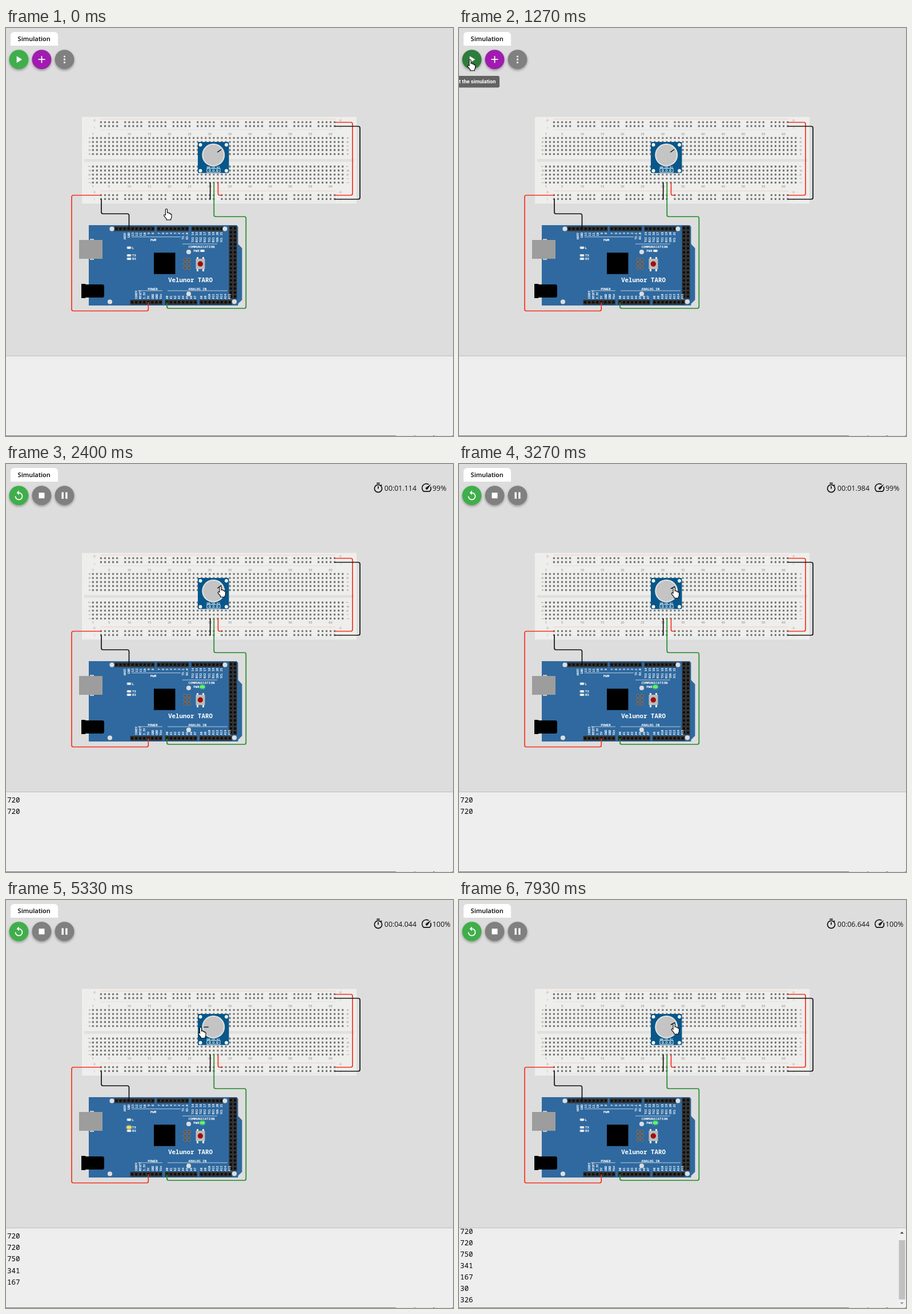
These frames come from a looping animation (783x716 px, 8000 ms). An HTML page:

```html
<!DOCTYPE html>
<html lang="en">
<head>
<meta charset="utf-8">
<title>Circuit simulation</title>
<style>
html, body { margin: 0; width: 100%; height: 100%; overflow: hidden; background: #ddd; }
svg { display: block; }
.tab { font: 600 11px "Open Sans", sans-serif; }
.ui { font: 600 9.2px Roboto, sans-serif; }
.clock { font: 12.4px "Open Sans", sans-serif; fill: #111; }
.mono { font-family: "Noto Sans Mono", monospace; }
.pins { font: 700 5.1px "Noto Sans Mono", monospace; fill: #fff; }
.grid { font: 600 5.6px "Open Sans", sans-serif; fill: #999; text-anchor: middle; }
.mid { text-anchor: middle; }
</style>
</head>
<body>
<svg id="stage" width="783" height="716" viewBox="0 0 783 716">
  <defs>
    <filter id="shadow" x="-30%" y="-30%" width="160%" height="170%">
      <feDropShadow dx="0" dy="2" stdDeviation="2" flood-opacity=".35"/>
    </filter>
    <filter id="glow" x="-100%" y="-100%" width="300%" height="300%"><feGaussianBlur stdDeviation="1.3"/></filter>
    <clipPath id="log"><rect y="576" width="770" height="139"/></clipPath>
  </defs>
  <rect width="783" height="716" fill="#ddd"/>
  <path d="M8 31V14q0-7 7-7H84q7 0 7 7V31z" fill="#fff"/>
  <text x="49.2" y="23.4" class="mid tab">Simulation</text>

  <g filter="url(#shadow)">
    <circle id="runButton" cx="22.5" cy="55.2" r="17"/>
    <circle id="midButton" cx="62.5" cy="55.2" r="17"/>
    <circle cx="102.5" cy="55.2" r="17" fill="#808080"/>
  </g>
  <g id="idleIcons" fill="#fff">
    <path d="M18.7 49.2V61.2L28.2 55.2z"/>
    <path d="M61.6 49.2h1.8v5.1h5.1v1.8h-5.1v5.1h-1.8v-5.1h-5.1v-1.8h5.1z"/>
    <circle cx="102.5" cy="50" r="1.6"/><circle cx="102.5" cy="55.2" r="1.6"/><circle cx="102.5" cy="60.4" r="1.6"/>
  </g>
  <g id="runIcons" fill="#fff">
    <path d="M22.5 50.6a6 6 0 1 1-6 6" fill="none" stroke="#fff" stroke-width="1.8"/>
    <path d="M22.8 46.6V54.6L18.6 50.6z"/>
    <rect x="57.5" y="50.3" width="10" height="10"/>
    <path d="M97.5 49.5h3.4v11.6h-3.4zM104.2 49.5h3.4v11.6h-3.4z"/>
  </g>

  <g id="breadboard">
    <rect x="133" y="156" width="481" height="152" fill="#eeeeec"/>
    <rect x="137" y="230" width="473" height="4.6" fill="#e0e0de"/>
    <path d="M166 159.8H577M166 286H577" stroke="#f2c9c4" stroke-width=".9"/>
    <path d="M166 178.5H577M166 305H577" stroke="#d3e4ea" stroke-width=".9"/>
  </g>
  <rect id="hover" width="5" height="5" fill="#5fb878" stroke="#222"/>
  <g id="pot">
    <rect x="336" y="200" width="54.5" height="54.5" rx="2" fill="#07578a"/>
    <g fill="#fff"><circle cx="340.6" cy="205" r="2.9"/><circle cx="386" cy="205" r="2.9"/><circle cx="340.6" cy="250.5" r="2.9"/><circle cx="386" cy="250.5" r="2.9"/></g>
    <circle cx="363.3" cy="222.8" r="20" fill="#e3e3e1"/>
    <circle cx="363.3" cy="222.8" r="18" fill="#c4c4c4"/>
    <path id="pointer" d="M363.3 214.3V205.8" stroke="#000" stroke-width="1.3"/>
    <text x="363.3" y="245.7" class="mid mono" font-size="3.6" font-weight="700" fill="#fff">GND SIG VCC</text>
    <rect x="352" y="246.7" width="23" height="6.3" fill="none" stroke="#fff" stroke-width=".9"/>
    <g fill="none" stroke="#fff" stroke-width=".9"><circle cx="357" cy="249.9" r="1.5"/><circle cx="363.5" cy="249.9" r="1.5"/><circle cx="370" cy="249.9" r="1.5"/></g>
  </g>

  <g id="board">
    <path d="M145 346H404L406.5 349V379L413.5 386.5V477L406.5 484V487H145z" fill="#2f699f"/>
    <path d="M147 370h7v37h-7z" fill="#c9c9c9"/>
    <rect x="128" y="372" width="41" height="33" fill="#9d9d9d"/>
    <path d="M132 449H138L140 450H169Q172 450 172 454V469Q172 473 169 473H140L138 474H132z"/>
    <rect x="259" y="394.3" width="37.5" height="37.5" fill="#000"/>
    <rect x="332.5" y="405" width="16" height="18" fill="#bbb"/>
    <path d="M334 402h3v3h-3zM344 402h3v3h-3zM334 423h3v4h-3zM344 423h3v4h-3z" fill="#eee"/>
    <circle cx="340.4" cy="414" r="4.7" fill="#a30d0d"/>
    <path d="M220 366.6H306M309 379H370M231 461H274M283 461H388" stroke="#dce6ef" stroke-width=".8"/>
    <g class="mono mid" fill="#fff" font-weight="700" font-size="5.9">
      <text x="258" y="374">PWM</text><text x="342.5" y="385.6">COMMUNICATION</text>
      <text x="257" y="459.6">POWER</text><text x="335.5" y="459.6">ANALOG IN</text>
      <text x="333.5" y="393">PWR</text><text x="222.5" y="387.8">L</text>
      <text x="224.5" y="401">TX</text><text x="224.5" y="407.4">RX</text>
      <text x="323" y="446" font-size="10.8">Velunor TARO</text>
    </g>
  </g>
  <g id="wires" fill="none" stroke-width="1.7"></g>
  <ellipse id="power" cx="344" cy="391" rx="4.5" ry="3.5" fill="#54ff5a" filter="url(#glow)"/>
  <ellipse id="tx" cx="215.5" cy="399" rx="4.5" ry="3.2" fill="#ffe14d" filter="url(#glow)"/>

  <g id="status" class="clock">
    <g fill="none" stroke="#111" stroke-width="1.7">
      <circle cx="652" cy="43" r="6.6"/><path d="M649.2 33.6h5.6M652 39v4.6M656.6 38l1.6-1.6"/>
      <path d="M740.5 36a7 7 0 1 0-8.5 12.2H741.8a7 7 0 0 0 1.8-8.4"/>
    </g>
    <path d="M744.5 35.2L738.6 44a2 2 0 0 1-3.2-2.6z"/>
    <text id="clock" x="662.8" y="46.6"></text><text id="speed" x="747" y="46.6"></text>
  </g>

  <g id="tip" class="ui">
    <rect x="-34" y="84" width="105" height="20.5" rx="3" fill="#636363"/>
    <text x="64.3" y="96.8" text-anchor="end" fill="#fff">Start the simulation</text>
  </g>

  <rect y="575" width="783" height="141" fill="#eee"/>
  <path d="M0 575.5H783" stroke="#bcbcbc"/>
  <g clip-path="url(#log)"><g id="lines" class="mono" font-size="12.5"></g></g>
  <g id="scrollbar">
    <rect x="770" y="576" width="13" height="139" fill="#f1f1f1"/>
    <rect x="770.5" y="597" width="11" height="104" fill="#c1c1c1"/>
    <path d="M772.5 585.5h6.6l-3.3-3.6z" fill="#444"/><path d="M772.5 706h6.6l-3.3 3.6z" fill="#999"/>
  </g>
  <path d="M0 715.5H783" stroke="#7a7a7a"/>
  <path d="M683 715.5h32M717 715.5h31M751 715.5h30" stroke="#ddd"/>
  <path id="cursor" d="M-1.6 1.6a1.6 1.6 0 0 1 3.2 0V7.5a1.4 1.4 0 0 1 2.8 .3v.5a1.3 1.3 0 0 1 2.5 .3v.6a1.2 1.2 0 0 1 2.1 .8V14q0 2-1.3 3.4V19.3H.2V17.6L-4.2 12.2a1.5 1.5 0 0 1 2.1-2L-1.6 10.8z" fill="#fff" stroke="#000" stroke-width="1.1"/>
</svg>
<script>
const $ = id => document.getElementById(id);
const LOOP = 8000, START = 1287, SECOND = 1000, PRINT_DELAY = 40;
const PITCH = 7.055, COL1 = 152.3, KNOB = { x: 363.3, y: 222.8 };
const READINGS = [720, 720, 750, 341, 167, 30, 326];
const TURNS = [...READINGS, 750];
const clamp = v => Math.min(1, Math.max(0, v));
const mix = (a, b, k) => a + (b - a) * k;
const ease = k => k * k * (3 - 2 * k);
const range = n => [...Array(n).keys()];
const colX = col => COL1 + (col - 1) * PITCH;
const rowY = row => 193 + row * PITCH + (row > 4 ? 14.8 : 0);
const square = (x, y, s) => `M${x - s / 2} ${y - s / 2}h${s}v${s}h${-s}z`;

function add(parent, tag, attrs, text) {
  const el = document.createElementNS('http://www.w3.org/2000/svg', tag);
  for (const key in attrs) el.setAttribute(key, attrs[key]);
  if (text !== undefined) el.textContent = text;
  return parent.appendChild(el);
}

function drawBreadboard() {
  const group = $('breadboard');
  let holes = '';
  for (let col = 1; col <= 63; col++) {
    for (const row of range(10)) holes += square(colX(col), rowY(row), 3.1);
    if (col > 2 && col < 62 && col % 6 !== 2)
      for (const y of [165.3, 293.3]) holes += square(colX(col), y, 3.1) + square(colX(col), y + 6.8, 3.1);
  }
  add(group, 'path', { d: holes, fill: '#707070' });
  for (let n = 0; n <= 60; n += 5)
    for (const y of [187.5, 280.3]) add(group, 'text', { x: colX(n || 1), y, class: 'grid' }, n || 1);
  for (const row of range(10))
    for (const x of [147.5, 600])
      add(group, 'text', { class: 'grid', transform: `translate(${x} ${rowY(row)})rotate(-90)` }, 'abcdefghij'[row]);
  for (const x of [155, 586])
    for (const y of [162, 288]) {
      add(group, 'path', { d: `M${x - 2.5} ${y}h5m-2.5-2.5v5`, stroke: '#dcaaa6', 'stroke-width': .8 });
      add(group, 'path', { d: `M${x} ${y + 11}v4`, stroke: '#b5c6d4', 'stroke-width': .8 });
    }
}

function header(x, y, cols, rows = 1) {
  add($('board'), 'rect', { x, y, width: cols * PITCH, height: rows * PITCH + 1.5, fill: '#333' });
  let d = '';
  for (const c of range(cols))
    for (const r of range(rows)) d += square(x + (c + .5) * PITCH, y + .7 + (r + .5) * PITCH, 3.8);
  add($('board'), 'path', { d, fill: '#0c0c0c' });
}

function pinLabels(x, y, anchor, names) {
  names.forEach((name, i) => add($('board'), 'text', {
    class: 'pins', 'text-anchor': anchor, transform: `translate(${x + i * PITCH + 1.8} ${y})rotate(-90)`
  }, name));
}

function drawController() {
  const board = $('board');
  for (const [x, cols] of [[190, 10], [264, 8], [324.5, 8]]) header(x, 348, cols);
  for (const x of [217.5, 278.5, 339]) header(x, 477, 8);
  header(390.5, 347, 2, 18);

  const serial = ['TX3', 'RX3', 'TX2', 'RX2', 'TX1', 'RX1', 'SDA', 'SCL'];
  const analog = range(16).map(i => 'A' + i);
  pinLabels(208, 359, 'end', ['AREF', 'GND', ...range(6).map(i => 13 - i)]);
  pinLabels(268, 359, 'end', [...range(6).map(i => 7 - i), 'TX→1', 'RX←0']);
  pinLabels(327.5, 358, 'end', serial.map((name, i) => `${name} ${14 + i}`));
  pinLabels(228.5, 475.8, 'start', ['IOREF', 'RESET', '3.3V', '5V', 'GND', 'GND', 'Vin']);
  pinLabels(282, 475.8, 'start', analog.slice(0, 8));
  pinLabels(342, 475.8, 'start', analog.slice(8));

  for (const [cx, cy] of [[185.5, 352.5], [383.5, 352.5], [320, 393], [320, 466.5], [182, 480.5], [400, 480.3]])
    add(board, 'circle', { cx, cy, r: 4.1, fill: '#ddd' });
  for (const i of range(6))
    add(board, 'circle', { cx: 313.6 + i % 2 * 7, cy: 406.7 + (i >> 1) * 7.1, r: 2.6, fill: '#5c544e', stroke: '#8d7a6b', 'stroke-width': .9 });
  for (const [x, y] of [[215.5, 385.6], [215.5, 399], [215.5, 405], [344, 391]]) {
    add(board, 'rect', { x: x - 4, y: y - 2, width: 8, height: 4, rx: .8, fill: '#b9c7d3' });
    add(board, 'rect', { x: x - 2.4, y: y - 1.8, width: 4.8, height: 3.6, fill: '#fff' });
  }
}

// Starts at (x, y); the remaining numbers are alternating vertical and horizontal stops, with rounded corners.
function wire(stroke, x, y, vertical, ...stops) {
  const r = 3;
  let d = `M${x} ${y}`;
  stops.forEach((stop, i) => {
    const from = vertical ? y : x, last = i === stops.length - 1;
    const end = last ? stop : stop - Math.sign(stop - from) * r;
    d += vertical ? `V${end}` : `H${end}`;
    if (vertical) y = stop; else x = stop;
    if (!last) {
      const turn = Math.sign(stops[i + 1] - (vertical ? x : y)) * r;
      d += `Q${x} ${y} ${vertical ? x + turn : x} ${vertical ? y : y + turn}`;
    }
    vertical = !vertical;
  });
  add($('wires'), 'path', { d, stroke });
}

function drawWires() {
  const red = '#f5301d', green = '#1f8b29', black = '#111';
  wire(red, 576, 165.5, false, 607, 293.5, 576);
  wire(black, 576, 172.5, false, 620, 300.5, 576);
  wire(red, 167, 293.5, false, 115, 496.5, 249.3, 481);
  wire(black, 167, 300, true, 326, 215.5, 352);
  wire(black, 357.7, 271, true, 301);
  wire(green, 364.3, 271, true, 331, 420.4, 492, 282, 481);
  wire(red, 371.5, 271, true, 293.5, 379);
}

// The knob rests after each reading, then turns to the next one.
function knobValue(t) {
  const beat = Math.max(0, (t - START) / SECOND);
  const i = Math.floor(beat);
  return mix(TURNS[i], TURNS[i + 1], ease(clamp((beat - i - .25) / .4)));
}
const knobAngle = value => value / 1023 * 270 - 135;

function gripPoint(t) {
  const value = knobValue(t), angle = knobAngle(value) * Math.PI / 180;
  const radius = 15 + 12 * (1 - value / 750) ** 2;
  return [KNOB.x + radius * Math.sin(angle), KNOB.y - radius * Math.cos(angle)];
}

function cursorAt(t) {
  const moves = [[70, 870, 19.5, 55.5], [1330, 1600, 293, 222], [1600, 1670, 369, 282], [1700, 2350, ...gripPoint(t)]];
  return moves.reduce(([x, y], [from, to, u, v]) => {
    const k = ease(clamp((t - from) / (to - from)));
    return [mix(x, u, k), mix(y, v, k)];
  }, [281, 317.5]);
}

const show = (id, on) => $(id).style.display = on ? '' : 'none';

// The hole marker trails the moving cursor.
function highlightHole(t) {
  const [x, y] = cursorAt(t - 70);
  const col = Math.round((x - COL1) / PITCH) + 1;
  const row = range(10).find(r => Math.abs(rowY(r) - y) < 3.5);
  const active = t > 140 && t < 1700 && row !== undefined && col >= 1 && col <= 63;
  show('hover', active);
  if (active) $('hover').setAttribute('transform', `translate(${colX(col) - 2.5} ${rowY(row) - 2.5})`);
}

function render(t) {
  const elapsed = Math.max(0, Math.round(t - START)), running = t >= START;
  $('cursor').setAttribute('transform', `translate(${cursorAt(t)})`);
  $('pointer').setAttribute('transform', `rotate(${knobAngle(knobValue(t))} ${KNOB.x} ${KNOB.y})`);
  highlightHole(t);

  $('runButton').setAttribute('fill', t > 780 && !running ? '#2e7b3a' : '#40ae4c');
  $('midButton').setAttribute('fill', running ? '#808080' : '#a01bb0');
  show('idleIcons', !running);
  for (const id of ['runIcons', 'status', 'power']) show(id, running);

  const hide = clamp((t - 1500) / 200);
  $('tip').setAttribute('opacity', clamp((t - 900) / 100) * (1 - hide));
  $('tip').setAttribute('transform', `translate(40 84)scale(${1 - .235 * hide})translate(-40 -84)`);

  $('clock').textContent = '00:0' + (elapsed / 1000).toFixed(3);
  $('speed').textContent = elapsed < 1000 ? '0%' : elapsed < 2900 ? '99%' : '100%';

  const sincePrint = t - START - PRINT_DELAY;
  const count = Math.max(0, Math.floor(sincePrint / SECOND) + 1);
  lines.forEach((line, i) => line.style.display = i < count ? '' : 'none');
  $('lines').setAttribute('transform', `translate(0 ${count > 6 ? -8.3 : 0})`);
  show('scrollbar', count > 6);
  show('tx', count && sincePrint % SECOND < 70);
}

drawBreadboard();
drawController();
drawWires();
const lines = READINGS.map((value, i) => add($('lines'), 'text', { x: 2, y: 594.2 + i * 20.1 }, value));

const origin = performance.now();
function tick() {
  render((performance.now() - origin) % LOOP);
  requestAnimationFrame(tick);
}
render(0);
requestAnimationFrame(tick);
</script>
</body>
</html>
```
